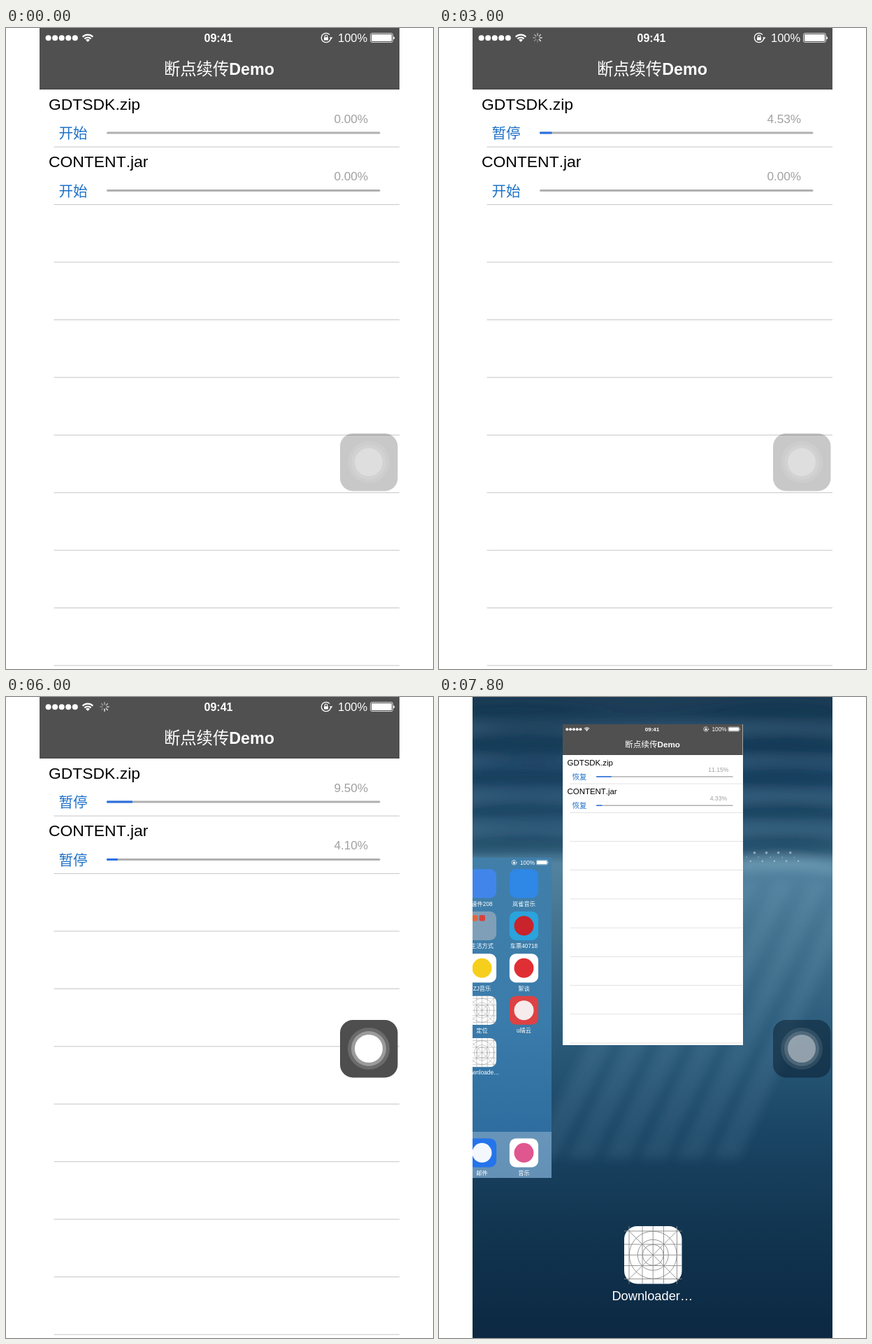
Animation, 611 px wide and 917 px high, one loop 8 s. Source, as an HTML page:

```html
<!DOCTYPE html>
<html lang="zh">
<head>
<meta charset="utf-8">
<title>断点续传Demo</title>
<style>
  html, body { margin: 0; width: 100%; height: 100%; overflow: hidden; background: #fff; }
  svg { display: block; }
  text { font-family: "Liberation Sans", Arial, "Noto Sans CJK SC", "Noto Sans CJK", sans-serif; font-kerning: none; }
  .mid { text-anchor: middle; }
  .name { font-size: 22.9px; }
  .action { font-size: 20.6px; fill: #1c70c8; }
  .percent { font-size: 17.2px; fill: #a0a0a0; }
  .label { font-size: 8.25px; fill: #fff; }
</style>
</head>
<body>
<svg id="stage" width="100%" height="100%" viewBox="0 0 611 917">
  <defs>
    <linearGradient id="sea" x2="0" y2="1">
      <stop offset="0" stop-color="#1d3d56"/>
      <stop offset=".12" stop-color="#22496a"/>
      <stop offset=".22" stop-color="#2f5a78"/>
      <stop offset=".26" stop-color="#5283a0"/>
      <stop offset=".36" stop-color="#43738f"/>
      <stop offset=".52" stop-color="#2c5c7b"/>
      <stop offset=".68" stop-color="#1a4564"/>
      <stop offset=".84" stop-color="#11344f"/>
      <stop offset="1" stop-color="#0c2842"/>
    </linearGradient>
    <linearGradient id="home" x2="0" y2="1">
      <stop offset="0" stop-color="#417fa9"/>
      <stop offset=".5" stop-color="#3a7cab"/>
      <stop offset="1" stop-color="#2a679a"/>
    </linearGradient>
    <filter id="soft" x="-20%" y="-20%" width="140%" height="140%"><feGaussianBlur stdDeviation="7"/></filter>
    <clipPath id="screen"><rect x="48" width="515" height="917"/></clipPath>
    <g id="power">
      <circle cx="458" cy="14" r="6.7" fill="none" stroke="#fff" stroke-width="1.3" stroke-dasharray="37 5.1"/>
      <path d="M463 13.2h4.4l-2.2 3z" fill="#fff"/>
      <rect x="455" y="13.2" width="6" height="4.3" rx=".6" fill="#fff"/>
      <path d="M456.2 13.5v-1.7a1.8 1.8 0 0 1 3.6 0v1.7" fill="none" stroke="#fff" stroke-width="1.1"/>
      <text x="475" y="20" font-size="16.5" fill="#fff">100%</text>
      <rect x="521.5" y="7.5" width="32" height="13" rx="2.5" fill="none" stroke="#fff" stroke-width=".8"/>
      <rect x="523" y="9" width="29" height="10" rx="1.3" fill="#fff"/>
      <path d="M554.4 12a2.4 2.4 0 0 1 0 4.6z" fill="#fff"/>
    </g>
    <g id="template">
      <rect width="82.5" height="82.5" rx="18.5" fill="#fff"/>
      <g id="guides" fill="none" stroke="#8b8b8b" stroke-width=".9"></g>
    </g>
  </defs>
  <rect width="611" height="917" fill="#fff"/>
  <g id="switcher" clip-path="url(#screen)"></g>
  <g id="app"></g>
  <g id="assist">
    <rect width="82.5" height="82.5" rx="18.5"/>
    <circle cx="41" cy="41" r="30" fill="#fff"/>
    <circle cx="41" cy="41" r="25" fill="#fff"/>
    <circle cx="41" cy="41" r="20" fill="#fff"/>
  </g>
</svg>
<script>
(() => {
const $ = id => document.getElementById(id);
const times = (n, draw) => Array.from({ length: n }, (_, i) => draw(i)).join('');

const STEP = 600, LOOP = 8000, ROW = 82.43, BAR = 391;
const START = '开始', PAUSE = '暂停', RESUME = '恢复';

// One entry per step; the first step lasts twice as long.
const progress = [
  [0, .14, 1.6, 3.07, 4.53, 5.71, 6.88, 7.76, 8.63, 9.5, 10.42, 11.15, 11.15],
  [0, 0, 0, 0, 0, .86, 1.71, 2.51, 3.3, 4.1, 4.33, 4.33, 4.33]
];
const startsAt = [1, 5], pausesAt = [11, 10], LAST = 12;

// Assist button: fill, fill opacity, opacity of the three discs
const idle = ['#000', .215, .09, .1, .25];
const touched = ['#4e4e4e', 1, .16, .32, 1];
const overSea = ['#061a2b', .5, .1, .15, .38];

const row = (name, i) => `<g transform="translate(0 ${i * ROW})">
  <text class="name" x="61" y="117">${name}</text>
  <text class="action mid" id="action${i}" x="96" y="158.2"></text>
  <text class="percent mid" id="percent${i}" x="493.8" y="136"></text>
  <rect x="144" y="148.5" width="${BAR + .5}" height="3" rx="1.5" fill="#b0b0b0"/>
  <rect id="bar${i}" x="144" y="148.5" height="3" rx="1.2" fill="#2a70e4"/>
</g>`;

const arc = r => {
  const d = r * Math.SQRT1_2;
  return `<path d="M${117 - d} ${20 - d}A${r} ${r} 0 0 1 ${117 + d} ${20 - d}" fill="none" stroke="#fff" stroke-width="2.2"/>`;
};

$('app').innerHTML = `
  <rect x="48" width="515" height="917" fill="#fff"/>
  <rect x="48" width="515" height="88" fill="#505050"/>
  <rect x="48" y="87" width="515" height="1" fill="#454545"/>
  ${times(5, i => `<circle cx="${60.6 + i * 9.55}" cy="14.3" r="4" fill="#fff"/>`)}
  ${arc(10.4)}${arc(6.5)}<path d="M117 20l-2.9-2.9a4.1 4.1 0 0 1 5.8 0z" fill="#fff"/>
  <g id="spinner" transform="translate(141 14)" stroke="#fff" stroke-width="1.4" stroke-linecap="round">
    ${times(8, i => `<path d="M0 -3.3V-6.2" transform="rotate(${i * 45})"/>`)}
  </g>
  <text class="mid" x="304" y="20" font-size="16" font-weight="bold" fill="#fff">09:41</text>
  <use href="#power"/>
  <text class="mid" x="305" y="66.6" font-size="23.3" fill="#fff">断点续传<tspan font-weight="bold">Demo</tspan></text>
  ${['GDTSDK.zip', 'CONTENT.jar'].map(row).join('')}
  ${times(10, i => `<rect x="68.5" y="${169.6 + i * ROW}" width="494.5" height="1.1" fill="#cbcbcb"/>`)}`;

const circles = [34, 22, 15].map(r => `<circle cx="41.25" cy="41.25" r="${r}"/>`).join('');
$('guides').innerHTML = circles + '<path d="M5 5L77.5 77.5M77.5 5L5 77.5"/>' +
  [7, 26, 41.25, 56.5, 75.5].map(p => `<path d="M${p} 0V82.5M0 ${p}H82.5"/>`).join('');

const label = (x, y, text) => `<text class="label mid" x="${x}" y="${y + 52.3}">${text}</text>`;
const tile = (x, y, text, fill, disc) => `
  <rect x="${x - 20.6}" y="${y}" width="41.2" height="41.2" rx="9.2" fill="${fill}"/>
  ${disc ? `<circle cx="${x}" cy="${y + 20.6}" r="14" fill="${disc}"/>` : ''}
  ${label(x, y, text)}`;
const blank = (x, y, text) => `
  <use href="#template" transform="translate(${x - 20.6} ${y}) scale(.5)"/>
  ${label(x, y, text)}`;

const L = 61.5, R = 121.5, shelf = i => 246.3 + i * 60.45;
const wave = i => {
  const y = 12 + i * 24, dip = i % 2 ? 9 : -8;
  return `<path d="M40 ${y}q90 ${dip} 180 4t190 -3t170 5v${8 + i % 3 * 3}q-90 ${-dip} -180 2t-190 -4t-170 3z"
    fill="${i % 2 ? '#4a7690' : '#0f2b42'}" opacity=".35"/>`;
};

$('switcher').innerHTML = `
  <rect x="48" width="515" height="917" fill="url(#sea)"/>
  <g filter="url(#soft)">
    ${times(9, wave)}
    <path d="M430 236q70 -14 140 6v12q-70 -12 -140 -4z" fill="#8fb4c8" opacity=".4"/>
    ${times(6, i => `<path d="M${330 + i * 50} 265l26 0L${170 + i * 52} 660l-40 0z" fill="#a5cbdc" opacity=".1"/>`)}
  </g>
  ${times(14, i => `<circle cx="${440 + i * 5.7}" cy="${229 + 7 * Math.sin(i * 2.1)}" r="${.8 + i % 3 * .5}" fill="#bcd3df" opacity=".65"/>`)}
  <svg x="48" y="229.5" width="112.5" height="458.5" viewBox="48 229.5 112.5 458.5">
    <rect x="48" y="229.5" width="113" height="459" fill="url(#home)"/>
    <rect x="48" y="622" width="113" height="66" fill="#fff" opacity=".27"/>
    <use href="#power" transform="translate(-121.5 229.7) scale(.5)"/>
    ${tile(L, shelf(0), '速件208', '#4285ea')}
    ${tile(R, shelf(0), '岚雀音乐', '#2f87e6')}
    ${tile(L, shelf(1), '生活方式', '#7f9fb8')}
    <rect x="47" y="312" width="8.5" height="8.5" rx="2" fill="#e0673f"/>
    <rect x="57.5" y="312" width="8.5" height="8.5" rx="2" fill="#d8423d"/>
    ${tile(R, shelf(1), '车票40718', '#2ba3dc', '#c9232b')}
    ${tile(L, shelf(2), 'ZJ音乐', '#fff', '#f6cf1d')}
    ${tile(R, shelf(2), '絮谈', '#fff', '#df2f35')}
    ${blank(L, shelf(3), '定位')}
    ${tile(R, shelf(3), 'u晴云', '#dd4244', '#f6eceb')}
    ${blank(L, shelf(4), 'Downloade…')}
    ${tile(L, 631.5, '邮件', '#2474ec', '#f4f8fe')}
    ${tile(R, 631.5, '音乐', '#fff', '#e0568f')}
  </svg>
  <use href="#template" transform="translate(265 757)"/>
  <text class="mid" x="305.3" y="862.5" font-size="18.3" fill="#fff">Downloader…</text>`;

const ticks = [...$('spinner').children];
const [plate, ...discs] = $('assist').children;

function show(step) {
  const switching = step === LAST;
  $('switcher').style.display = switching ? '' : 'none';
  $('app').setAttribute('transform', switching ? 'translate(153 39) scale(.5)' : 'scale(1)');

  progress.forEach((list, i) => {
    const p = list[step];
    $('action' + i).textContent = step >= pausesAt[i] ? RESUME : step >= startsAt[i] ? PAUSE : START;
    $('percent' + i).textContent = p.toFixed(2) + '%';
    $('bar' + i).setAttribute('width', p ? Math.max(6, BAR * p / 100) : 0);
  });

  $('spinner').style.display = step >= startsAt[0] && step < pausesAt[0] ? '' : 'none';
  ticks.forEach((tick, i) => tick.setAttribute('opacity', .25 + .65 * ((i + step * 3) % 8) / 7));

  const [fill, alpha, ...glow] = switching ? overSea : step >= 7 && step < 10 ? touched : idle;
  $('assist').setAttribute('transform', `translate(478 ${step < 7 ? 580 : 462})`);
  plate.setAttribute('fill', fill);
  plate.setAttribute('opacity', alpha);
  discs.forEach((disc, i) => disc.setAttribute('opacity', glow[i]));
}

let current = -1;
const began = performance.now();
function frame() {
  const t = (performance.now() - began) % LOOP;
  const step = Math.max(0, Math.floor(t / STEP) - 1);
  if (step !== current) show(current = step);
  requestAnimationFrame(frame);
}
frame();
})();
</script>
</body>
</html>
```
